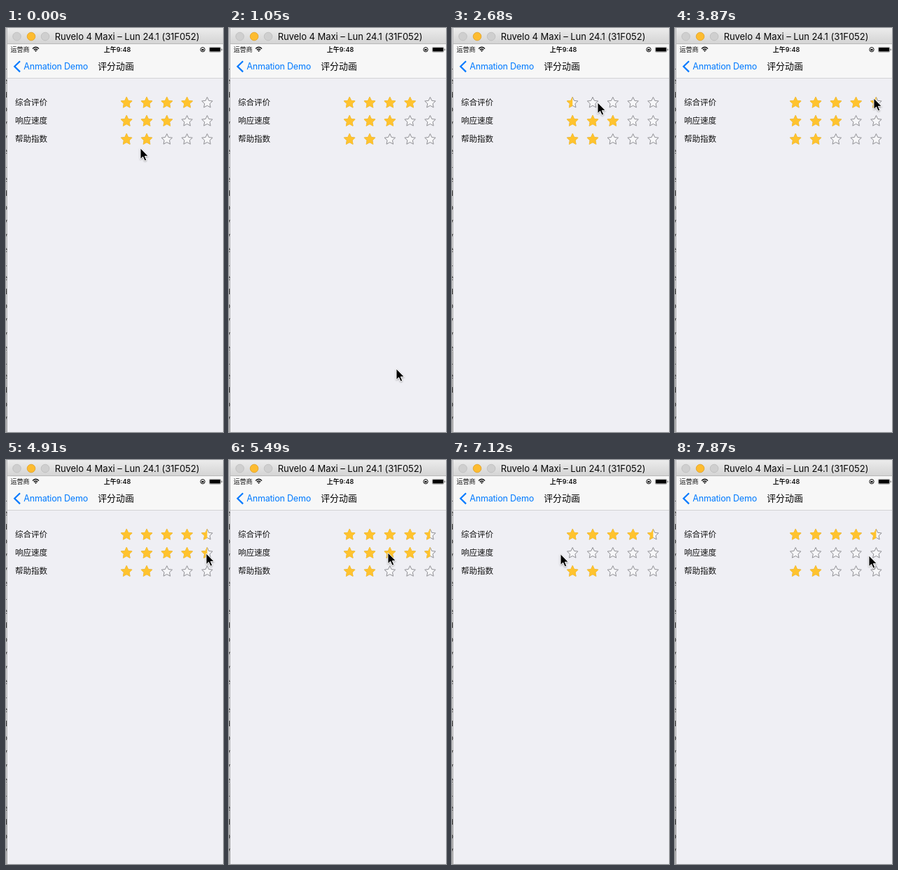
Animation, 310 px wide and 575 px high, one loop 8000 ms. Source, as an HTML page:

```html
<!DOCTYPE html>
<html lang="zh-CN">
<head>
<meta charset="utf-8">
<style>
  html, body { margin: 0; width: 100%; height: 100%; overflow: hidden; background: #efeff4; }
  svg { display: block; width: 310px; height: 575px; }
  text { font-family: "Noto Sans CJK SC", "Noto Sans CJK", sans-serif; white-space: pre; }
  .latin { font-family: Inter, Roboto, sans-serif; }
  .label { font-size: 11.5px; fill: #111; }
  .code { font: 11px "DejaVu Sans Mono", monospace; fill: #333; }
  .star { stroke-linejoin: round; }
  .empty { fill: #f6f6f8; stroke: #8f8f94; }
  .full { fill: #ffc32e; stroke: #ffc32e; stroke-width: 1.1; }
</style>
</head>
<body>
<svg viewBox="0 0 310 575">
  <defs>
    <linearGradient id="bar" x2="0" y2="1">
      <stop offset="0" stop-color="#ececec"/>
      <stop offset="1" stop-color="#d3d3d3"/>
    </linearGradient>
    <linearGradient id="edge">
      <stop offset="0" stop-color="#e2e2e2"/>
      <stop offset="1" stop-color="#a9a9ac"/>
    </linearGradient>
    <clipPath id="strip"><rect width="2" height="575"/></clipPath>
    <filter id="shadow" x="-50%" y="-50%" width="200%" height="200%">
      <feDropShadow dx="0" dy="1" stdDeviation="0.8" flood-opacity=".35"/>
    </filter>
  </defs>

  <rect width="310" height="575" fill="#efeff4"/>
  <rect width="2" height="575" fill="url(#edge)"/>
  <rect y="460" width="2" height="115" opacity=".12"/>
  <g id="code" clip-path="url(#strip)"></g>

  <path d="M2 23V4Q2 0 6 0H310V23Z" fill="url(#bar)"/>
  <path d="M2 22.5H310" stroke="#b9b9b9"/>
  <g stroke-width=".8">
    <circle cx="15.5" cy="12" r="5.8" fill="#cfcfcf" stroke="#bbb"/>
    <circle cx="36" cy="12" r="5.8" fill="#fdbc30" stroke="#e0a023"/>
    <circle cx="56" cy="12" r="5.8" fill="#cfcfcf" stroke="#bbb"/>
  </g>
  <text class="latin" x="173" y="16.8" font-size="13" letter-spacing="-.05" text-anchor="middle" fill="#080808">Ruvelo 4 Maxi – Lun 24.1 (31F052)</text>

  <rect x="2" y="23" width="308" height="48" fill="#f7f7f7"/>
  <path d="M2 71.5H310" stroke="#d3d3d6"/>
  <text x="6.5" y="34" font-size="9" fill="#111">运营商</text>
  <g fill="none" stroke="#111" stroke-width="1.3">
    <path d="M38 29.4Q42.5 25.2 47 29.4M39.8 31.2Q42.5 28.8 45.2 31.2"/>
    <path d="M41.2 32L42.5 33.6L43.8 32Z" fill="#111" stroke-width=".5"/>
  </g>
  <text x="159" y="34" font-size="9" font-weight="600" text-anchor="middle" fill="#111">上午<tspan class="latin">9:48</tspan></text>
  <circle cx="281" cy="30.7" r="3.2" fill="none" stroke="#111"/>
  <rect x="279.4" y="29.8" width="3.2" height="2.5" fill="#111"/>
  <rect x="290.3" y="27.3" width="16.6" height="7" rx="1.5" fill="#fff" stroke="#777" stroke-width=".6"/>
  <rect x="291" y="28" width="15.2" height="5.6" rx=".8"/>
  <rect x="307.6" y="29.5" width="1" height="2.6" rx=".5" fill="#555"/>

  <path d="M20 47.2L12.2 54.8L20 62.4" fill="none" stroke="#007aff" stroke-width="2.2"/>
  <text class="latin" x="25.3" y="59.2" font-size="12.5" letter-spacing="-.2" fill="#007aff">Anmation Demo</text>
  <text x="157" y="59.1" font-size="12.9" font-weight="500" text-anchor="middle">评分动画</text>

  <g id="rows"></g>
  <path id="cursor" d="M0 0V15.6L3.6 12.3L6.1 18L8.7 16.9L6.3 11.4H11.2Z" stroke="#fff" stroke-width=".9" filter="url(#shadow)"/>
</svg>
<script>
// The screen refreshes in ticks; all moves and clicks are timed in them.
const LOOP = 8000, TICK = 148.4, GAP = 28.8, FIRST = 172.2, LEFT = FIRST - GAP / 2;

const rows = [
  { label: '综合评价', rate: 4, clicks: [15, 25] },
  { label: '响应速度', rate: 3, clicks: [33, 44, 48] },
  { label: '帮助指数', rate: 2, clicks: [] }
];

const home = { x: 192, y: 171 };
const moves = [
  { from: 0, to: 3, x: 289, y: 485 },
  { from: 3, to: 4, x: 239, y: 485 },
  { from: 7, to: 13, x: 170, y: 102 },
  { from: 15, to: 18, x: 208, y: 106 },
  { from: 18, to: 20, x: 245, y: 122 },
  { from: 20, to: 23, x: 284, y: 100 },
  { from: 26, to: 29, x: 286, y: 133 },
  { from: 33, to: 41, x: 168, y: 131 },
  { from: 43, to: 49, x: 154, y: 134 },
  { from: 49, to: 53, x: 277, y: 136 }
];

const $ = id => document.getElementById(id);
const ease = k => k * k * (3 - 2 * k);
const mix = (a, b, k) => a + (b - a) * k;

function pointer(tick) {
  return moves.filter(m => m.from <= tick).reduce((p, m) => {
    const k = ease(Math.min(1, (tick - m.from) / (m.to - m.from)));
    return { x: mix(p.x, m.x, k), y: mix(p.y, m.y, k) };
  }, home);
}

// A click rates up to the pointer, rounded up to half a star.
function rating({ rate, clicks }, tick) {
  const last = clicks.filter(c => c <= tick).pop();
  if (last === undefined) return rate;
  return Math.max(0, Math.ceil((pointer(last).x - LEFT) / GAP * 2) / 2);
}

function star(cx, cy, R) {
  const pts = Array.from({ length: 10 }, (_, i) => {
    const r = i % 2 ? R * 0.48 : R, a = (i / 5 - 0.5) * Math.PI;
    return (cx + r * Math.cos(a)).toFixed(2) + ' ' + (cy + r * Math.sin(a)).toFixed(2);
  });
  return 'M' + pts.join('L') + 'Z';
}

$('rows').innerHTML = rows.map(({ label }, i) => {
  const y = 106 + i * 26.1;
  const d = [0, 1, 2, 3, 4].map(n => star(FIRST + n * GAP, y + 0.5, 8.1)).join('');
  return `
    <text class="label" x="13" y="${y + 3.9}">${label}</text>
    <clipPath id="clip${i}"><rect id="fill${i}" x="${LEFT}" y="${y - 13}" height="26"/></clipPath>
    <path class="star empty" d="${d}"/>
    <path class="star full" d="${d}" clip-path="url(#clip${i})"/>`;
}).join('');

const letters = 'ledoyye';
for (let i = 0; i < 26; i++) {
  $('code').innerHTML += `<text class="code" x="-4.5" y="${59 + i * 20}">${letters[i % letters.length]}</text>`;
}

function draw(time) {
  const tick = Math.floor((time % LOOP + 3) / TICK);
  const { x, y } = pointer(tick);
  $('cursor').setAttribute('transform', `translate(${x} ${y})`);
  rows.forEach((row, i) => $('fill' + i).setAttribute('width', rating(row, tick) * GAP));
}

const start = performance.now();
function frame() {
  draw(performance.now() - start);
  requestAnimationFrame(frame);
}
frame();
</script>
</body>
</html>
```
